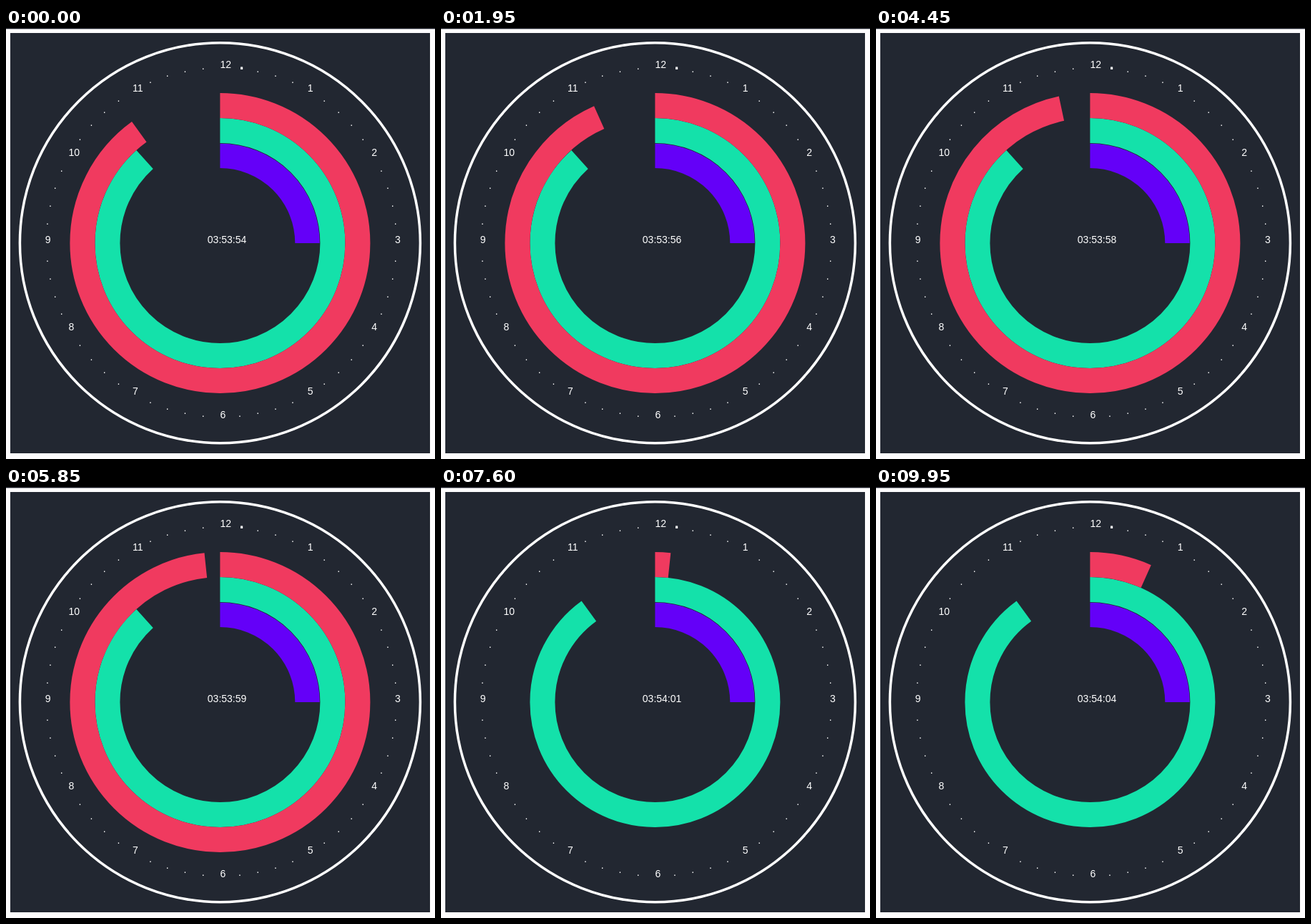
These frames come from a looping animation (600 px wide and 603 px high, 10 s). An HTML page:

```html
<!DOCTYPE html>
<html lang="en">
<head>
<meta charset="utf-8">
<title>Arc clock</title>
<style>
  html, body { margin: 0; width: 100%; height: 100%; overflow: hidden; background: #fdfcfd; }
  svg { display: block; width: 600px; height: 603px; }
  text { font: 14px "Liberation Sans", Arial, sans-serif; fill: #fff; }
</style>
</head>
<body>
<svg viewBox="0 0 600 603">
  <rect width="600" height="1.3" fill="#10131c"/>
  <rect x="6" y="7" width="587" height="588" fill="#222731"/>
  <g id="clock" transform="translate(299.4 301)" fill="none">
    <circle cy="-.3" r="280" stroke="#fff" stroke-width="3.5"/>
  </g>
</svg>
<script>
const LOOP = 10000, START = 3 * 3600 + 53 * 60 + 54, LEAD = 110;
const clock = document.getElementById('clock');

function add(tag, attrs, text = '') {
  const el = document.createElementNS('http://www.w3.org/2000/svg', tag);
  for (const key in attrs) el.setAttribute(key, attrs[key]);
  el.textContent = text;
  return clock.appendChild(el);
}

// Hour numbers, with a dot for every other minute
for (let m = 1; m <= 60; m++) {
  const a = m * Math.PI / 30;
  const mark = add('text', { x: 244.7 * Math.sin(a), y: -244.7 * Math.cos(a) }, m % 5 ? '.' : m / 5);
  if (m === 1) mark.style.fontSize = '33px';
}

const ring = (r, width, color) => add('circle', {
  r, stroke: color, 'stroke-width': width, pathLength: 360, transform: 'rotate(-90)'
});
const rings = [
  ring(122.1, 34.4, '#6400f8'),
  ring(157.5, 35, '#14e1aa'),
  ring(192.5, 35, '#f03a5f')
];
const label = add('text', { x: -17.6, y: 0 });

function draw(now) {
  const t = now % LOOP;
  const total = START + Math.floor((t + LEAD) / 1000);
  const parts = [Math.floor(total / 3600), Math.floor(total / 60) % 60, total % 60];
  const angles = [parts[0] * 30, parts[1] * 6, parts[2] * 6];
  rings.forEach((el, i) => {
    el.setAttribute('stroke-dasharray', `${angles[i]} 400`);
    el.setAttribute('visibility', angles[i] ? 'visible' : 'hidden');
  });
  label.textContent = parts.map(n => String(n).padStart(2, '0')).join(':');
}

const begin = performance.now();
function frame() {
  draw(performance.now() - begin);
  requestAnimationFrame(frame);
}
frame();
</script>
</body>
</html>
```
